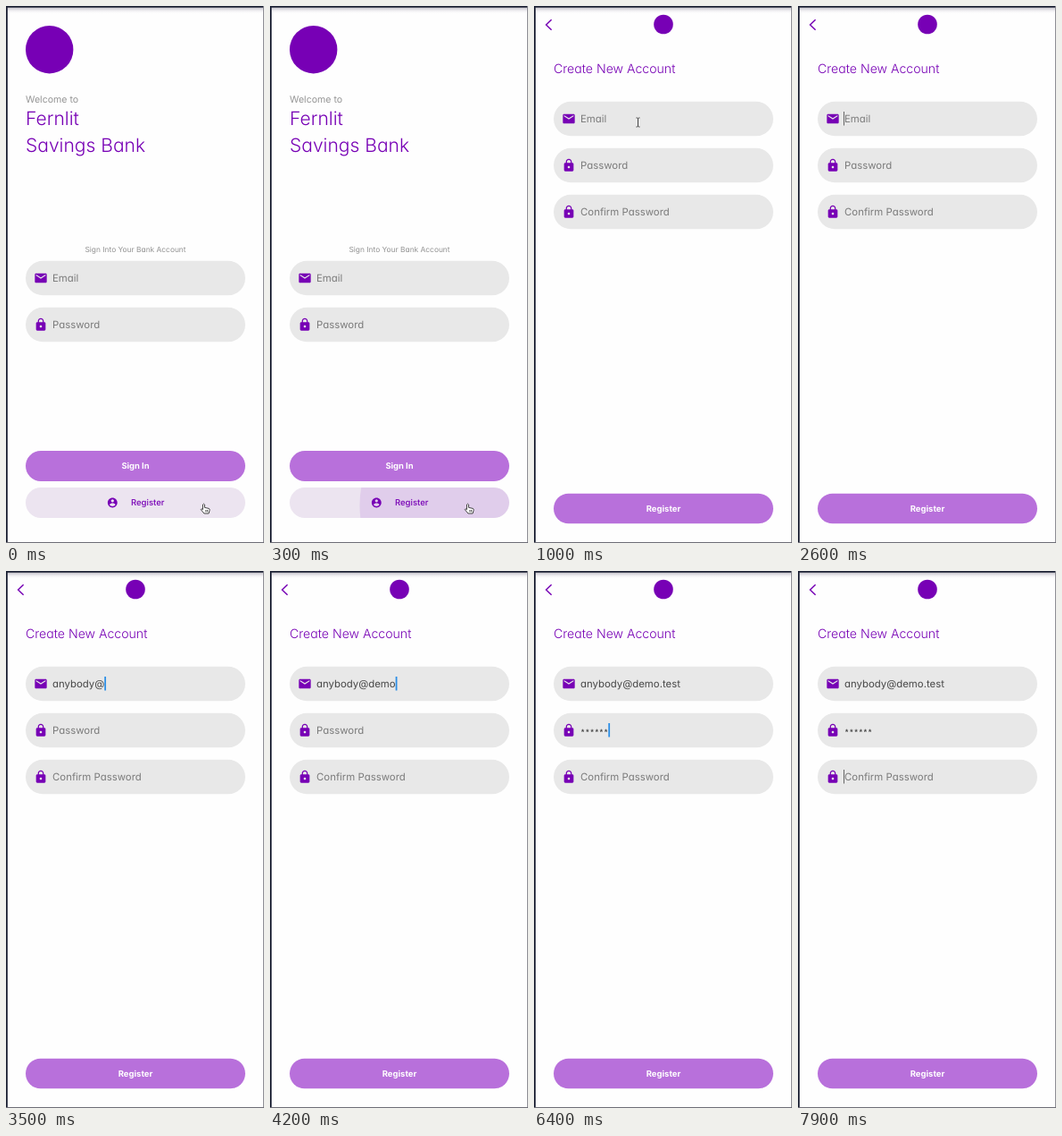
An HTML page for the animation above (8000 ms loop, 289x600 px).

```html
<!DOCTYPE html>
<html lang="en">
<head>
<meta charset="utf-8">
<title>Create account</title>
<style>
  html, body { margin: 0; width: 100%; height: 100%; overflow: hidden; background: #fefefe; }
  svg { position: fixed; inset: 0; width: 100%; height: 100%; display: block; }
  text { font-family: Inter, "Open Sans", sans-serif; font-feature-settings: "cv11"; text-rendering: geometricPrecision; white-space: pre; }
  .stars { font-family: "Liberation Mono", monospace; font-weight: 700; }
</style>
</head>
<body>
<svg id="stage" viewBox="0 0 289 600">
  <defs>
    <linearGradient id="topShade" x2="0" y2="1">
      <stop offset="0" stop-color="#8d8898" stop-opacity=".65"/>
      <stop offset=".5" stop-color="#b9b4c2" stop-opacity=".25"/>
      <stop offset="1" stop-color="#fff" stop-opacity="0"/>
    </linearGradient>
    <linearGradient id="sideShade">
      <stop offset="0" stop-color="#52423f" stop-opacity=".03"/>
      <stop offset="1" stop-color="#52423f" stop-opacity=".24"/>
    </linearGradient>
    <clipPath id="pill"><rect x="22" y="538" width="246" height="34" rx="17"/></clipPath>
  </defs>
  <g id="welcome"></g>
  <g id="register"></g>
  <g id="frame">
    <rect x="2" y="1" width="286" height="8" fill="url(#topShade)"/>
    <rect width="289" height="1.7" fill="#1b2033"/>
    <rect width="1.8" height="600" fill="#1b2033"/>
    <rect x="288" width="1" height="600" fill="#8c8c93"/>
    <rect y="599" width="289" height="1" fill="#6d6d76"/>
  </g>
  <g id="pointers"></g>
</svg>
<script>
const LOOP = 8000;
const PURPLE = '#7700b5', LILAC = '#b870db', FIELD = '#e8e8e8', HINT = '#7b7b7b', INK = '#484848';
const MAIL = 'M20 4H4c-1.1 0-1.99.9-1.99 2L2 18c0 1.1.9 2 2 2h16c1.1 0 2-.9 2-2V6c0-1.1-.9-2-2-2zm0 4l-8 5-8-5V6l8 5 8-5v2z';
const LOCK = 'M18 8h-1V6c0-2.76-2.24-5-5-5S7 3.24 7 6v2H6c-1.1 0-2 .9-2 2v10c0 1.1.9 2 2 2h12c1.1 0 2-.9 2-2V10c0-1.1-.9-2-2-2zm-6 9c-1.1 0-2-.9-2-2s.9-2 2-2 2 .9 2 2-.9 2-2 2zm3.1-9H8.9V6c0-1.71 1.39-3.1 3.1-3.1s3.1 1.39 3.1 3.1v2z';
const PERSON = 'M12 2C6.48 2 2 6.48 2 12s4.48 10 10 10 10-4.48 10-10S17.52 2 12 2zm0 3c1.66 0 3 1.34 3 3s-1.34 3-3 3-3-1.34-3-3 1.34-3 3-3zm0 14.2c-2.5 0-4.71-1.28-6-3.22.03-1.99 4-3.08 6-3.08 1.99 0 5.97 1.09 6 3.08-1.29 1.94-3.5 3.22-6 3.22z';

const $ = id => document.getElementById(id);

function el(parent, tag, attrs, content) {
  const node = document.createElementNS('http://www.w3.org/2000/svg', tag);
  for (const k in attrs) node.setAttribute(k, attrs[k]);
  if (content) node.textContent = content;
  return parent.appendChild(node);
}
const set = (node, attrs) => { for (const k in attrs) node.setAttribute(k, attrs[k]); };
const show = (node, on) => node.setAttribute('visibility', on ? 'visible' : 'hidden');
const label = (g, x, y, size, fill, weight, str, anchor = 'start') =>
  el(g, 'text', { x, y, 'font-size': size, fill, 'font-weight': weight, 'text-anchor': anchor }, str);
const pill = (g, y, h, fill) => el(g, 'rect', { x: 22, y, width: 246, height: h, rx: h / 2, fill });
const icon = (g, d, cx, cy, size) =>
  el(g, 'path', { d, fill: PURPLE, transform: `translate(${cx - size / 2} ${cy - size / 2}) scale(${size / 24})` });

function field(g, cy, glyph, hint) {
  pill(g, cy - 19.2, 38.5, FIELD);
  icon(g, glyph, 39, cy, 16);
  return label(g, 52, cy + 4, 11.4, HINT, 400, hint);
}

// Welcome page
const welcome = $('welcome');
el(welcome, 'rect', { width: 400, height: 600, fill: '#fefefe' });
el(welcome, 'circle', { cx: 48.7, cy: 48.7, r: 26.7, fill: PURPLE });
label(welcome, 22, 107.5, 10.6, '#959595', 400, 'Welcome to');
label(welcome, 22, 133.3, 21, PURPLE, 300, 'Fernlit');
label(welcome, 22, 163.3, 21, PURPLE, 300, 'Savings Bank');
label(welcome, 145, 274.5, 8.4, '#929292', 400, 'Sign Into Your Bank Account', 'middle');
field(welcome, 304, MAIL, 'Email');
field(welcome, 356, LOCK, 'Password');
pill(welcome, 497, 34, LILAC);
label(welcome, 145, 517.3, 9.4, '#fff', 700, 'Sign In', 'middle');
pill(welcome, 538, 34, '#ece4f0');
const ripple = el(welcome, 'circle', { cx: 221, cy: 558, fill: PURPLE, opacity: .1, 'clip-path': 'url(#pill)' });
icon(welcome, PERSON, 119.3, 555, 13);
label(welcome, 140, 558.3, 9.5, PURPLE, 500, 'Register');

// Register page
const register = $('register');
el(register, 'rect', { x: -12, width: 12, height: 600, fill: 'url(#sideShade)' });
el(register, 'rect', { width: 289, height: 600, fill: '#fefefe' });
el(register, 'path', { d: 'M19.6 15.2L13.6 21L19.6 26.8', fill: 'none', stroke: PURPLE, 'stroke-width': 1.5 });
el(register, 'circle', { cx: 145, cy: 20.5, r: 10.8, fill: PURPLE });
label(register, 22, 74.5, 14.1, PURPLE, 300, 'Create New Account');
const rows = [126, 178, 230];
const hints = [
  field(register, rows[0], MAIL, 'Email'),
  field(register, rows[1], LOCK, 'Password'),
  field(register, rows[2], LOCK, 'Confirm Password')
];
const email = label(register, 52, rows[0] + 4, 11.4, INK, 400, '');
const stars = label(register, 52, rows[1] + 4.6, 8.7, INK, 700, '');
stars.setAttribute('class', 'stars');
const caret = el(register, 'rect', { height: 15.5 });
pill(register, 544.7, 33.6, LILAC);
label(register, 145, 565, 9.5, '#fff', 700, 'Register', 'middle');

// Mouse pointers, each with its hot spot at 0,0
const outline = { stroke: '#333', 'stroke-width': .9, 'stroke-linejoin': 'round' };
const pointers = $('pointers');
const hand = el(pointers, 'path', { ...outline, fill: '#fff',
  d: 'M-1 1Q0-.6 1 1V4.4L5.6 5.4Q7 5.8 6.6 7.4L5.6 11H.4L-3.2 6.6Q-3 5-1 6.6ZM2.4 7V9.4M4.2 7V9.4' });
const arrow = el(pointers, 'path', { stroke: '#fff', 'stroke-width': .6, fill: '#222',
  d: 'M0 0V9L2 7.2L3.4 10.4L4.9 9.7L3.5 6.6H6.2Z' });
const beam = el(pointers, 'path', { fill: 'none', stroke: '#444', 'stroke-width': 1,
  d: 'M-2-5H-.6L0-4.4L.6-5H2M0-4.4V4.4M-2 5H-.6L0 4.4L.6 5H2' });

// Typing: [text, start, time between keys]
const KEYS = [['anybody', 2700, 83], ['@', 3500, 0], ['dem', 3700, 150], ['o', 4200, 0], ['.test', 4300, 25]]
  .flatMap(([str, start, gap]) => [...str].map((ch, i) => [ch, start + i * gap]));
const typed = t => KEYS.filter(k => k[1] <= t).map(k => k[0]).join('');
const starCount = t => t < 5400 ? 0 : Math.min(6, 1 + Math.floor((t - 5400) / 200));

// Caret strength: [time, value], held until the next
const BLINK = [[0, 0], [1700, 1], [1800, .5], [1900, 0], [2600, .5], [2700, 1], [4700, .5], [4800, 0],
  [5300, .5], [5400, 1], [6700, .5], [6800, 0], [7100, 1], [7200, .5], [7300, 0], [7700, .2], [7800, .35], [7900, .5]];
const strength = t => BLINK.filter(b => b[0] <= t).pop()[1];

const clamp = v => Math.max(0, Math.min(1, v));
const ease = u => u * u * (3 - 2 * u);

function drawPages(t) {
  const open = t >= 400;
  const dx = open ? 12 * (1 - clamp((t - 400) / 350)) ** 3 : 289;
  set(register, { transform: `translate(${dx} 0)` });
  show(register, open);
  set(welcome, { transform: `translate(${open ? (dx - 289) / 3 : 0} 0)` });
  set(ripple, { r: t < 100 ? 0 : 20 + (t - 100) * .5 });
}

function drawForm(t) {
  const mail = typed(t), count = starCount(t);
  email.textContent = mail;
  stars.textContent = '*'.repeat(count);
  show(hints[0], t >= 400 && !mail);
  show(hints[1], t >= 400 && !count);

  const row = t < 4600 ? 0 : t < 7100 ? 1 : 2;
  const text = [email, stars, null][row];
  const end = text && text.textContent ? text.getComputedTextLength() : 0;
  const s = strength(t), solid = s === 1;
  set(caret, {
    x: 52 + end - (end ? 0 : 1), y: rows[row] - 8,
    width: solid ? 1.8 : 1, fill: solid ? '#2d8fe6' : '#444', opacity: solid ? 1 : s * 1.6
  });
}

function drawPointer(t) {
  const u = ease(clamp((t - 450) / 450));
  const x = 221.5 - 105 * u;
  const y = 556 - 429 * u + (t >= 1000 ? 3 : 0);
  const onField = y < 250;
  show(hand, t < 400);
  show(arrow, t >= 400 && !onField);
  show(beam, onField && t < 2600);
  for (const p of [hand, arrow, beam]) set(p, { transform: `translate(${x} ${y})` });
}

function render(t) {
  drawPages(t);
  drawForm(t);
  drawPointer(t);
}

const begin = performance.now();
function tick() {
  render((performance.now() - begin) % LOOP);
  requestAnimationFrame(tick);
}
render(0);
requestAnimationFrame(tick);
</script>
</body>
</html>
```
